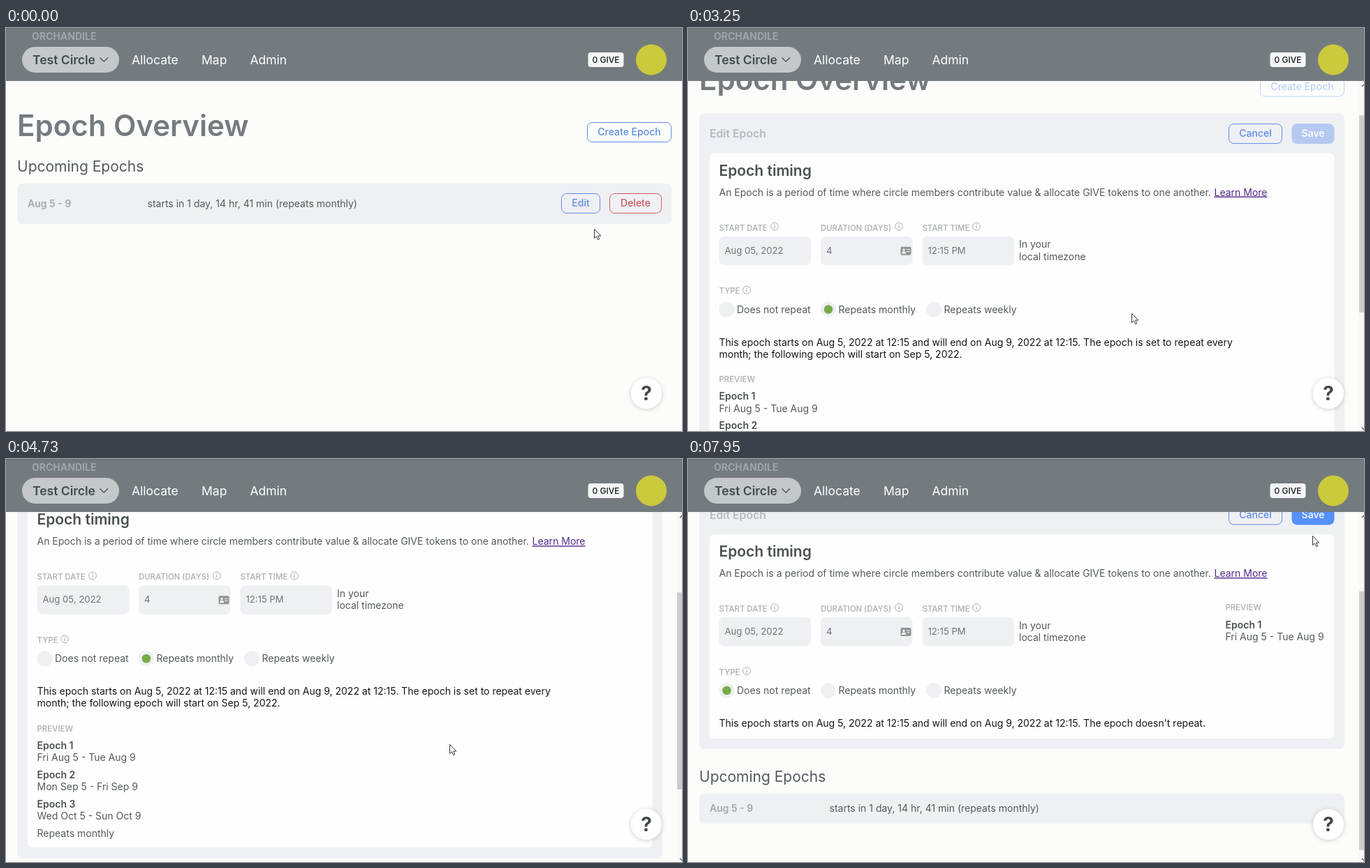
Animation, 968 px wide and 578 px high, one loop 8 s. Source, as an HTML page:

```html
<!DOCTYPE html>
<html lang="en">
<head>
<meta charset="utf-8">
<title>Epoch overview</title>
<style>
html, body { margin: 0; width: 100%; height: 100%; overflow: hidden; background: #fcfdfb; }
svg { display: block; width: 968px; height: 578px; font-family: Inter, "Liberation Sans", sans-serif; }
text { white-space: pre; }
</style>
</head>
<body>
<svg id="stage" viewBox="0 0 968 578" xmlns="http://www.w3.org/2000/svg"></svg>
<script>
const LOOP = 8000;
const SHOW_FORM = 1990, SHOW_ICON = 2700, SHOW_SINGLE = 5960;
const BLUE = '#5e8be6', RED = '#cf5a5e', PANEL = '#eff0f4', INK = '#54595c', GREY = '#a3a6aa', LABEL = '#b3b6b9';

// Keyframes: [time, value...]
const SCROLL = [[3090, 0], [3250, 65], [3860, 288], [3900, 302], [4000, 302], [4200, 347],
  [4570, 347], [4730, 183], [4900, 137]];
const POINTER = [[450, 842, 288], [870, 816, 252], [2620, 816, 252], [2870, 635, 409],
  [4950, 635, 409], [5310, 55, 337], [6630, 55, 337], [6840, 496, 300], [7050, 496, 302],
  [7500, 932, 210], [7850, 904, 98], [7880, 897, 88], [7915, 895, 91], [7950, 894, 110]];
const CLICKS = [[1880, 2060], [5870, 6050]];

const text = (x, y, str, size = 14, fill = INK, weight = 400, extra = '') =>
  `<text x="${x}" y="${y}" font-size="${size}" fill="${fill}" font-weight="${weight}" ${extra}>${str}</text>`;
const box = (x, y, w, h, fill, r = 7, extra = '') =>
  `<rect x="${x}" y="${y}" width="${w}" height="${h}" rx="${r}" fill="${fill}" ${extra}/>`;
const group = (id, ...parts) => `<g id="${id}">${parts.join('')}</g>`;
const label = (x, y, str) => text(x, y, str, 11.375, LABEL, 600);

function button(x, y, w, str, color, id = '', filled = false) {
  const rect = box(x + .5, y + .5, w - 1, 28, filled ? color : 'none', 7, `stroke="${color}"`);
  return group(id, rect, text(x + w / 2, y + 19, str, 14, filled ? '#fff' : color, 500, 'text-anchor="middle"'));
}

const info = (x, y) => `<g fill="none" stroke="#a9acaf"><circle cx="${x}" cy="${y}" r="5.4"/>
  <path d="M${x} ${y - 3}v1.3M${x} ${y - .8}v3.8" stroke-width="1.2"/></g>`;

const field = (x, str) => box(x, 364, 131.5, 41.5, PANEL) + text(x + 8, 389, str, 13.125, '#6f7477');

const radio = (id, cx, str) =>
  `<circle id="${id}" cx="${cx}" cy="469" r="11" fill="${PANEL}"/>` + text(cx + 14.5, 474, str);

const epoch = (x, y, n, dates) =>
  text(x, y, 'Epoch ' + n, 14, '#4b5053', 600) + text(x, y + 17.5, dates);

const row = (y, w, h) => box(16, y, w, h, PANEL) +
  text(31, y + h / 2 + 4.5, 'Aug 5 - 9', 14, GREY, 600) +
  text(202.5, y + h / 2 + 4.5, 'starts in 1 day, 14 hr, 41 min (repeats monthly)');

const upcoming = y => text(16, y, 'Upcoming Epochs', 21);

const list = group('list',
  button(832, 135, 121, 'Create Epoch', BLUE),
  upcoming(206), row(223, 937, 58),
  button(795, 237, 56, 'Edit', BLUE, 'edit'),
  button(864, 237, 75, 'Delete', RED));

const cardIcon = `<g id="icon"><rect x="304.5" y="379" width="15" height="12" rx="2" fill="#8f9497"/>
  <path d="M306.5 388.5a2.6 2.6 0 0 1 5.2 0zM313 383h4.5M313 386h4.5" fill="#fff" stroke="#fff" stroke-width=".9"/>
  <circle cx="309" cy="383.4" r="1.6" fill="#fff"/></g>`;

const form = group('form',
  `<g opacity=".4">${button(819, 135, 121, 'Create Epoch', BLUE)}</g>`,
  `<rect id="outer" x="16" y="188" width="924" rx="7" fill="${PANEL}"/>`,
  `<rect id="inner" x="31" y="245" width="894.5" rx="7" fill="#fefefe"/>`,
  text(31, 222.5, 'Edit Epoch', 15.75, '#b5b8bd', 600),
  button(774, 202.5, 77, 'Cancel', BLUE),
  button(864.5, 202.5, 61, 'Save', '#b5c9f0', 'save', true),
  text(44.5, 277, 'Epoch timing', 21, '#4b5053', 600),
  text(44.5, 306, 'An Epoch is a period of time where circle members contribute value &amp; allocate GIVE tokens to one another.'),
  text(753.5, 306, 'Learn More', 14, '#532a8c', 400, 'text-decoration="underline"'),
  label(44.5, 356, 'START DATE'), info(124, 350),
  label(190, 356, 'DURATION (DAYS)'), info(302, 350),
  label(335.5, 356, 'START TIME'), info(413, 350),
  field(44.5, 'Aug 05, 2022'), field(190, '4'), field(335.5, '12:15 PM'), cardIcon,
  text(474, 380.5, 'In your'), text(474, 398, 'local timezone'),
  label(44.5, 446.5, 'TYPE'), info(84, 441),
  radio('once', 55.5, 'Does not repeat'),
  radio('monthly', 201, 'Repeats monthly'),
  radio('weekly', 352, 'Repeats weekly'),
  '<circle id="dot" cy="469" r="6.3" fill="#77ab48"/>',
  `<text id="summary" x="44.5" y="521" font-size="14" fill="#151617"></text>`,
  group('repeating',
    text(44.5, 538, 'month; the following epoch will start on Sep 5, 2022.', 14, '#151617'),
    label(44.5, 573.5, 'PREVIEW'),
    epoch(44.5, 598.5, 1, 'Fri Aug 5 - Tue Aug 9'),
    epoch(44.5, 640.5, 2, 'Mon Sep 5 - Fri Sep 9'),
    epoch(44.5, 682.5, 3, 'Wed Oct 5 - Sun Oct 9'),
    text(44.5, 724.5, 'Repeats monthly')),
  group('single', label(769.5, 354, 'PREVIEW'), epoch(769.5, 379.5, 1, 'Fri Aug 5 - Tue Aug 9')),
  group('below', upcoming(802), row(819, 924, 43)));

const scrollbar = group('scrollbar',
  box(961, 76, 7, 502, '#f7f8f7', 0),
  '<rect id="thumb" x="961" width="7" fill="#cbcccb"/>',
  '<path d="M965 84l3-3M965 573l3 3" stroke="#55595b" stroke-width="1.4"/>');

const header = group('header',
  box(0, 0, 968, 76, '#747b7f', 0), box(0, 0, 968, 1, '#656c70', 0),
  text(37, 16.5, 'ORCHANDILE', 14, '#a0a5a8', 700),
  box(23, 27, 139, 37, '#c5c8c9', 18.5),
  text(38, 52, 'Test Circle', 17.5, '#444a4d', 600),
  '<path d="M134.5 42.5l5.7 5.7 5.7-5.7" fill="none" stroke="#444a4d" stroke-width="1.3"/>',
  text(180, 52, 'Allocate', 17.5, '#fff'),
  text(280, 52, 'Map', 17.5, '#fff'),
  text(349.5, 52, 'Admin', 17.5, '#fff'),
  box(833.5, 35, 51, 21, '#f4f5f6', 4),
  text(859, 49.5, '0 GIVE', 12, '#17191a', 500, 'text-anchor="middle"'),
  '<circle cx="924" cy="45.5" r="22" fill="#cbc93c"/>');

const help = `<circle cx="917" cy="524" r="22" fill="#fff" filter="url(#shadow)"/>` +
  text(917, 533.5, '?', 28, '#43484b', 700, 'text-anchor="middle"');

const pointer = `<g id="pointer">
  <circle id="click" r="11" fill="#e0d92c" opacity=".65"/>
  <path id="arrow" d="M.5.5V13.6L3.5 10.9 5.6 15.7 7.7 14.8 5.6 10.1H9.8Z" fill="#fff" stroke="#34383c" stroke-width="1"/>
  <path id="hand" d="M-1.2 11V1.2Q-1.2-.5.3-.5T1.8 1.2V6Q3.4 5 4.4 6.5 6 5.6 6.8 7.2 8.4 6.7 8.6 8.6V12.5Q8.4 15 7.2 16.5V19H-.2V17Q-2.6 14.4-4.7 10.8-5.1 9.3-3.7 9-2.6 9-1.2 11ZM1.8 6V9.5M4.4 6.5V9.7M6.8 7.2V10"
    fill="#fff" stroke="#22262a" stroke-width="1"/></g>`;

const stage = document.getElementById('stage');
stage.innerHTML = `<defs><filter id="shadow" x="-30%" y="-30%" width="160%" height="160%">
  <feDropShadow dx="0" dy="1" stdDeviation="3" flood-color="#000" flood-opacity=".2"/></filter></defs>` +
  box(0, 0, 968, 578, '#fcfdfb', 0) +
  group('page', text(16, 154.5, 'Epoch Overview', 42, '#747b7f', 600), list, form) +
  scrollbar + header + help + pointer;

const $ = id => document.getElementById(id);
const set = (id, attrs) => { for (const k in attrs) $(id).setAttribute(k, attrs[k]); };
const show = (id, on) => set(id, { display: on ? 'inline' : 'none' });
const linear = u => u;
const smooth = u => u * u * (3 - 2 * u);

function sample(keys, t, ease) {
  const next = keys.findIndex(k => k[0] > t);
  if (next === 0) return keys[0].slice(1);
  if (next < 0) return keys[keys.length - 1].slice(1);
  const a = keys[next - 1], b = keys[next];
  const u = ease((t - a[0]) / (b[0] - a[0]));
  return a.slice(1).map((v, i) => v + (b[i + 1] - v) * u);
}

function paintButton(id, fill, stroke, ink) {
  $(id).firstElementChild.setAttribute('fill', fill);
  $(id).firstElementChild.setAttribute('stroke', stroke);
  $(id).lastElementChild.setAttribute('fill', ink);
}

function render(t) {
  const editing = t >= SHOW_FORM, single = t >= SHOW_SINGLE;
  const [scroll] = sample(SCROLL, t, linear);
  const [x, y] = sample(POINTER, t, smooth);
  const within = (l, top, r, b) => x >= l && x <= r && y >= top && y <= b;

  set('page', { transform: `translate(0 ${-scroll})` });
  show('list', !editing);
  show('form', editing);
  show('scrollbar', editing);
  show('icon', t >= SHOW_ICON);

  const overEdit = !editing && within(795, 237, 851, 266);
  const overSave = single && within(865, 76, 925, 94);
  paintButton('edit', overEdit ? '#638fe8' : 'none', BLUE, overEdit ? '#fff' : BLUE);
  const saveColor = overSave ? '#638fe8' : single ? '#5590fb' : '#b5c9f0';
  paintButton('save', saveColor, saveColor, '#fff');

  const shift = single ? 202 : 0;
  set('outer', { height: 567 - shift });
  set('inner', { height: 495 - shift });
  set('below', { transform: `translate(0 ${-shift})` });
  show('repeating', !single);
  show('single', single);
  $('summary').textContent = 'This epoch starts on Aug 5, 2022 at 12:15 and will end on Aug 9, 2022 at 12:15. ' +
    (single ? "The epoch doesn't repeat." : 'The epoch is set to repeat every');
  set('dot', { cx: single ? 55.5 : 201 });
  const overOnce = editing && Math.hypot(x - 55.5, y + scroll - 469) < 11;
  set('once', { fill: overOnce ? '#e7f3dc' : PANEL });

  const content = 849 - shift;
  set('thumb', { y: 88.5 + scroll * 478 / content, height: 478 * 502 / content });

  const hand = overEdit || overSave;
  set('pointer', { transform: `translate(${x} ${y})` });
  show('hand', hand);
  show('arrow', !hand);
  show('click', CLICKS.some(([from, to]) => t >= from && t < to));
}

const start = performance.now();
function tick() {
  render((performance.now() - start) % LOOP);
  requestAnimationFrame(tick);
}
tick();
</script>
</body>
</html>
```
